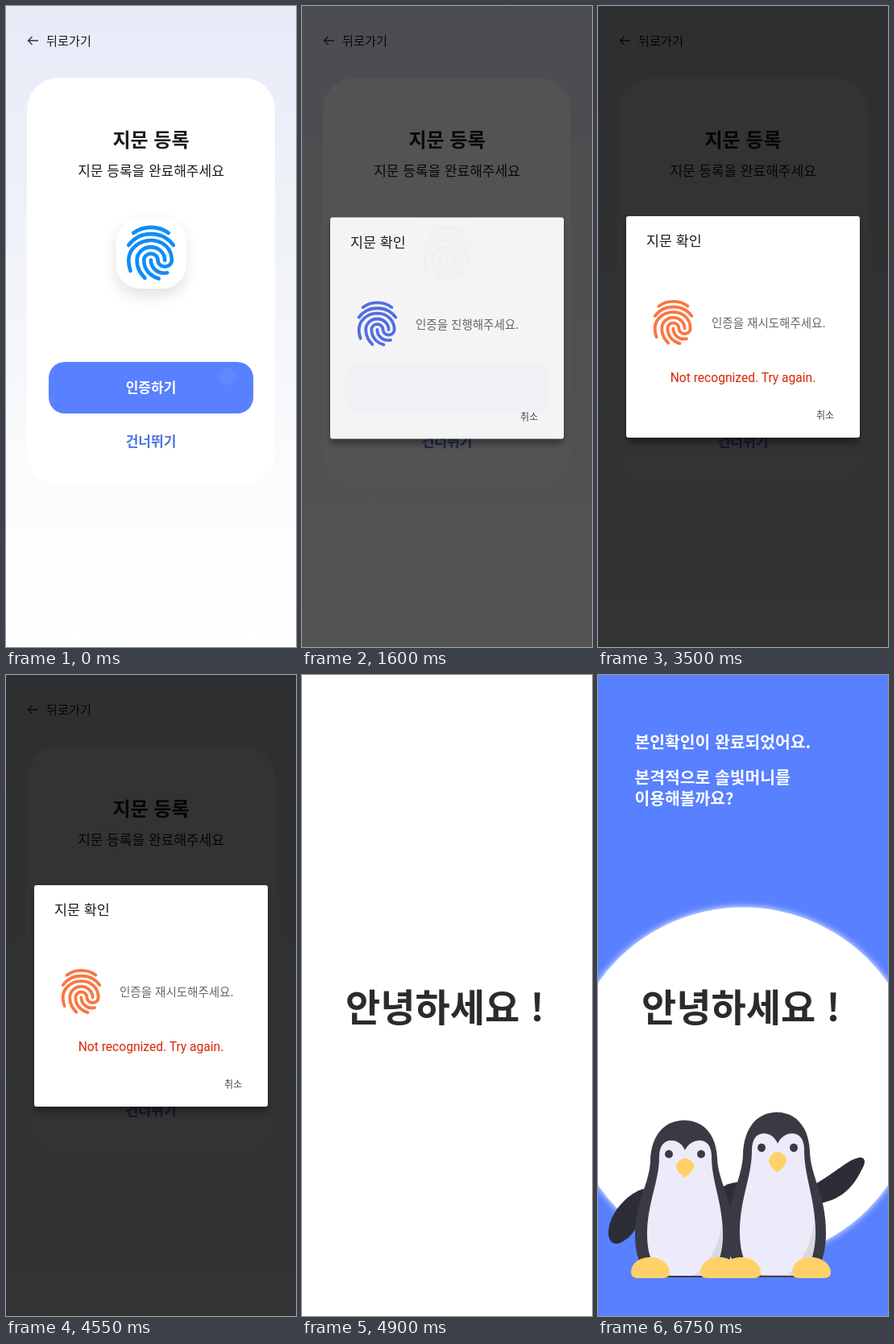
An HTML page that plays this animation: 360 px wide and 796 px high, repeating every 6900 ms.

```html
<!DOCTYPE html>
<html lang="ko">
<head>
<meta charset="utf-8">
<style>
  html, body { margin: 0; width: 100%; height: 100%; overflow: hidden; background: #fff; }
  svg { display: block; width: 100%; height: 100%; }
  text { font-family: "Noto Sans CJK KR", "Noto Sans CJK", sans-serif; fill: #1c1c1e; }
  .mid { text-anchor: middle; }
  .bold { font-weight: 700; }
  .medium { font-weight: 500; }
  .latin { font-family: Roboto, sans-serif; }
</style>
</head>
<body>
<svg viewBox="0 0 360 796">
  <defs>
    <linearGradient id="sky" x2="0" y2="1">
      <stop offset="0" stop-color="#e6ebf8"/>
      <stop offset=".35" stop-color="#eff2f8"/>
      <stop offset=".72" stop-color="#fbfbfd"/>
      <stop offset="1" stop-color="#fff"/>
    </linearGradient>
    <filter id="soft" x="-50%" y="-50%" width="200%" height="200%"><feGaussianBlur stdDeviation="9"/></filter>
    <filter id="glow"><feGaussianBlur stdDeviation="4"/></filter>
    <g id="print" fill="none" stroke-width="1.38" stroke-linecap="round">
      <path d="M5.5 4.6C7.4 3.2 9.6 2.5 12 2.5s4.600.7 6.500 2.100"/>
      <path d="M3.700 9.100C4.600 7.800 5.800 6.800 7.100 6.100c2.900-1.500 6.900-1.500 9.800 0 1.300.7 2.500 1.700 3.400 3"/>
      <path d="M4.400 18.600c-.5-1.300-.7-2.600-.7-3.900C3.700 10.600 7.400 7.300 12 7.300s7.700 3.300 7.700 7.360a2.580 2.440 0 0 1-5.160 0a2.580 2.440 0 0 0-5.160 0c0 1.850.7 3.600 2 4.870 1 1 2 1.550 3.500 1.970"/>
      <path d="M9.750 21.300c-.8-.8-1.300-1.400-1.950-2.500-.65-1.200-1-2.600-1-4.100 0-2.700 2.300-4.900 5.160-4.900s5.160 2.200 5.160 4.900"/>
      <path d="M11.940 14.660c0 1.600.8 3.100 2.160 4 .8.550 1.700.8 2.800.8q.6 0 1.100-.1"/>
    </g>
    <g id="penguin">
      <path fill="#3a3a44" d="M107 553C132 553 147 572 148 600C149 630 168 650 168 695C168 730 155 748 140 748H76C58 748 46 728 46 695C46 655 64 632 65 603C66 572 82 553 107 553Z"/>
      <path fill="#ecebfa" d="M108 590C104 581 97 578 91 578C81 578 76 586 76 598C76 630 61 655 61 695C61 725 72 746 90 746H128C146 746 155 722 155 695C155 655 141 630 141 598C141 586 136 578 126 578C119 578 112 582 108 590Z"/>
      <path fill="#d9d9e2" d="M154 680C150 710 136 735 118 746H128C146 746 157 720 154 680Z"/>
      <circle cx="88" cy="595" r="5" fill="#3a3a44"/>
      <circle cx="128" cy="595" r="5" fill="#3a3a44"/>
      <path fill="#ffd166" d="M108 600C114 600 120 607 119 611C117 617 112 621 108 624C103 621 98 617 97 611C97 607 102 600 108 600Z"/>
    </g>
    <path id="foot" fill="#ffd166" d="M0 742C0 728 14 723 24 723C37 723 48 732 48 742Q48 749 39 749H9Q0 749 0 742Z"/>
  </defs>

  <g id="enroll">
    <rect width="360" height="796" fill="url(#sky)"/>
    <path d="M40 43H27.500M32.500 38l-5 5 5 5" fill="none" stroke="#333" stroke-width="1.300"/>
    <text class="medium" x="50" y="48.600" font-size="15.200">뒤로가기</text>
    <rect x="26" y="89" width="308" height="506" rx="40" fill="#fff"/>
    <text class="mid bold" x="180" y="175" font-size="24">지문 등록</text>
    <text class="mid" x="180" y="211.300" font-size="17">지문 등록을 완료해주세요</text>
    <rect x="136" y="270" width="88" height="90" rx="30" opacity=".11" filter="url(#soft)"/>
    <rect x="136.500" y="263" width="87.500" height="88" rx="30" fill="#fff"/>
    <use href="#print" transform="translate(139.800 266.500) scale(3.350)" stroke="#108cf8"/>
    <rect x="53" y="442" width="254" height="64" rx="20" fill="#5880ff"/>
    <text class="mid bold" x="180" y="480.300" font-size="17" style="fill:#fff">인증하기</text>
    <text class="mid bold" x="180" y="547.300" font-size="17" style="fill:#4c74e0">건너뛰기</text>
    <g id="touch">
      <circle r="12" fill="#fff" opacity=".35" filter="url(#glow)"/>
      <circle r="10" fill="#dfe2f2" opacity=".65"/>
    </g>
    <rect id="dim" width="360" height="796"/>
    <g id="dialog">
      <rect x="36" y="267" width="288" height="275" rx="4" opacity=".4" filter="url(#glow)"/>
      <rect x="35" y="261" width="290" height="275" rx="3" fill="#fff"/>
      <text class="medium" x="60" y="298" font-size="17.400">지문 확인</text>
      <g id="ask">
        <use href="#print" transform="translate(60.500 360) scale(2.750)" stroke="#5270ee"/>
        <text x="141" y="399.400" font-size="14.500" style="fill:#666">인증을 진행해주세요.</text>
      </g>
      <g id="retry">
        <use href="#print" transform="translate(60.500 360) scale(2.750)" stroke="#fa7640"/>
        <text x="141" y="399.400" font-size="14.500" style="fill:#666">인증을 재시도해주세요.</text>
        <text class="mid latin" x="180" y="467" font-size="15.600" style="fill:#dd2404">Not recognized. Try again.</text>
      </g>
      <text x="271" y="513.400" font-size="12" style="fill:#444">취소</text>
    </g>
  </g>

  <g id="welcome">
    <rect width="360" height="796" fill="#5880ff"/>
    <circle class="disc" cx="180" cy="508" fill="#fff" filter="url(#glow)"/>
    <circle class="disc" cx="180" cy="508" fill="#fff"/>
    <text class="bold" x="54" y="430" font-size="47" style="fill:#2b2b2b">안녕하세요 !</text>
    <g id="done">
      <g class="bold" font-size="20.400">
        <text x="45.500" y="90.500" style="fill:#fff">본인확인이 완료되었어요.</text>
        <text x="45.500" y="134.500" style="fill:#fff">본격적으로 솔빛머니를</text>
        <text x="45.500" y="160.500" style="fill:#fff">이용해볼까요?</text>
      </g>
      <g fill="#2d2d37">
        <path d="M57 638C40 642 15 665 13 690C12 704 20 709 28 705C40 699 47 690 52 675Z"/>
        <path d="M150 640Q162 628 180 630V685H165Z"/>
        <path d="M270 632C295 618 312 600 326 599C333 600 332 607 327 615C315 640 298 652 276 656Z"/>
      </g>
      <use href="#penguin"/>
      <use href="#foot" x="41"/>
      <use href="#foot" x="127"/>
      <use href="#penguin" transform="translate(115 -38.300) scale(1 1.051)"/>
      <use href="#foot" x="154"/>
      <use href="#foot" x="241"/>
    </g>
  </g>
</svg>
<script>
  const LOOP = 6900;
  const $ = id => document.getElementById(id);
  const ramp = (t, from, to) => Math.min(1, Math.max(0, (t - from) / (to - from)));
  const easeOut = (p, power) => 1 - (1 - p) ** power;
  const fade = (id, value) => $(id).setAttribute('opacity', value);
  const show = (id, on) => $(id).setAttribute('visibility', on ? 'visible' : 'hidden');

  function draw(t) {
    const greeting = t >= 4850;
    show('enroll', !greeting);
    show('welcome', greeting);

    // A fading trace of the finger, then the tap on the button
    const early = t < 700;
    $('touch').setAttribute('transform', early ? 'translate(275 460)' : 'translate(192 479)');
    fade('touch', early ? .1 * (1 - ramp(t, 50, 250)) : ramp(t, 1250, 1380) * (1 - ramp(t, 1450, 1600)));

    // The dialog rises in and leaves upwards
    const enter = ramp(t, 1450, 1700), leave = ramp(t, 4550, 4850);
    const shown = easeOut(enter, 3), gone = leave ** 1.3;
    fade('dim', .8 * easeOut(enter, 2) * (1 - leave ** 2.3));
    fade('dialog', shown * (1 - gone));
    $('dialog').setAttribute('transform', `translate(0 ${25 * (1 - shown) - 10 * gone})`);
    const failed = ramp(t, 2950, 3200);
    fade('ask', 1 - failed);
    fade('retry', failed);

    const reveal = ramp(t, 4930, 5180);
    const radius = 560 + (219.5 - 560) * easeOut(reveal, 2);
    document.querySelectorAll('.disc').forEach(c => c.setAttribute('r', radius));
    fade('done', reveal);
  }

  const start = performance.now();
  function tick() {
    draw((performance.now() - start) % LOOP);
    requestAnimationFrame(tick);
  }
  tick();
</script>
</body>
</html>
```
